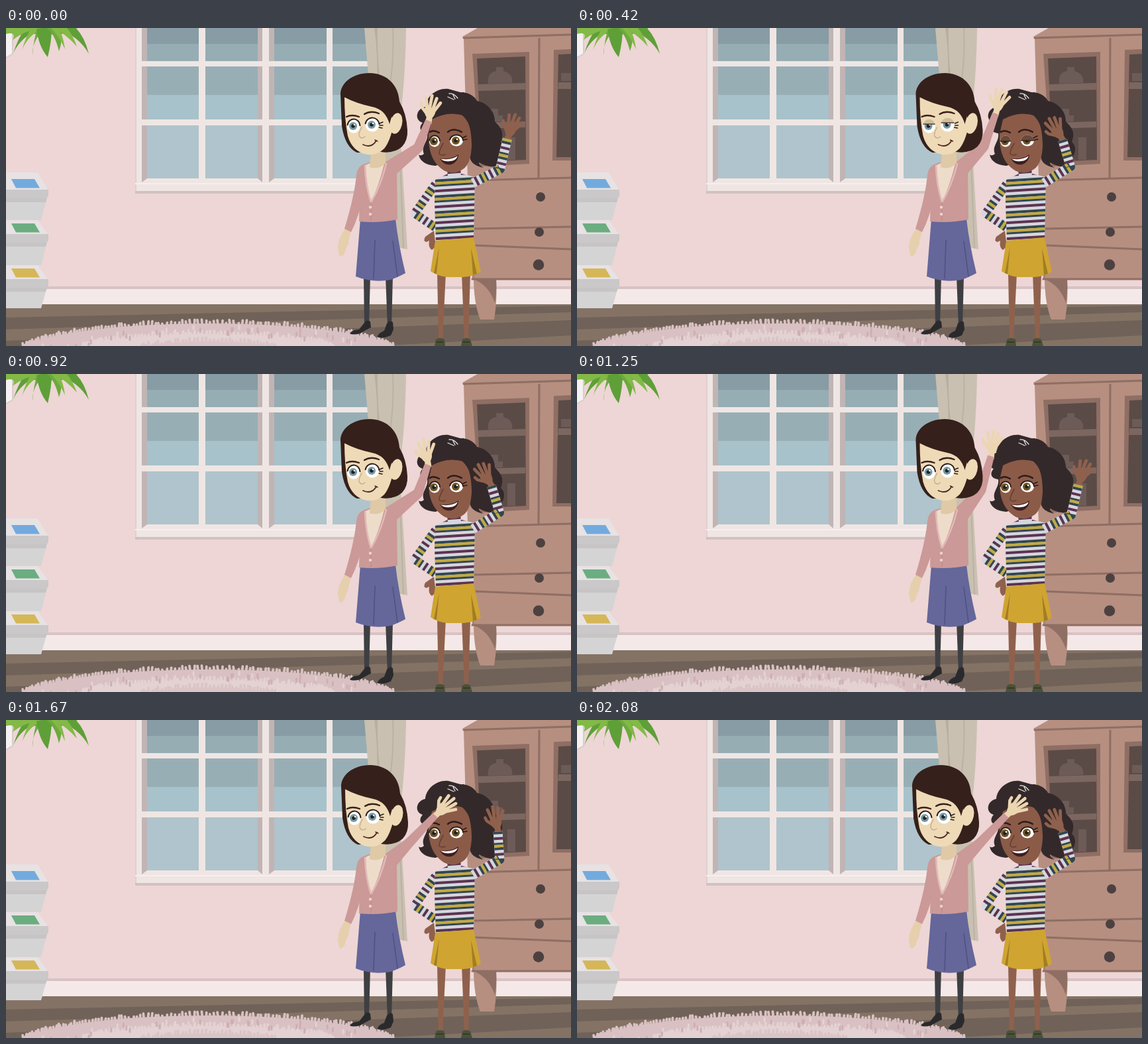
These frames come from a looping animation (853 by 480 pixels, 2160 ms). An HTML page with a canvas:

```html
<!DOCTYPE html>
<html lang="en">
<head>
<meta charset="utf-8">
<title>Two women waving</title>
<style>
html, body { margin: 0; width: 100%; height: 100%; overflow: hidden; background: #edd6d5; }
canvas { display: block; }
</style>
</head>
<body>
<canvas id="stage" width="853" height="480"></canvas>
<script>
const screen2d = document.getElementById('stage').getContext('2d');
const room = document.createElement('canvas');
room.width = 853;
room.height = 480;
let g = room.getContext('2d');

const fill = (d, color) => { g.fillStyle = color; g.fill(new Path2D(d)); };
const line = (d, color, w) => {
  g.strokeStyle = color; g.lineWidth = w; g.lineCap = g.lineJoin = 'round';
  g.stroke(new Path2D(d));
};
const rect = (x, y, x2, y2, color) => { g.fillStyle = color; g.fillRect(x, y, x2 - x, y2 - y); };
const oval = (x, y, rx, ry, color, turn = 0) => {
  g.fillStyle = color; g.beginPath(); g.ellipse(x, y, rx, ry, turn, 0, 7); g.fill();
};
let seed = 7;
const rnd = () => (seed = seed * 16807 % 2147483647) / 2147483647;

// ---------- room ----------
function drawWindow() {
  const bar = '#efe6e4', side = '#c1b4b5';
  rect(195, 0, 560, 250, bar);
  rect(195, 0, 197, 247, '#dfd0cf');
  rect(195, 246, 560, 250, '#d2c1c1');
  rect(195, 234, 560, 236, '#f6efed');
  for (const [x, x2, shade] of [[205, 291, -1], [301, 387, 1], [397, 484, -1], [493, 560, 0]]) {
    const a = shade < 0 ? x + 8 : x, b = shade > 0 ? x2 - 7 : x2;
    rect(x, 0, x2, 50, side);
    rect(x, 58, x2, 138, side);
    rect(x, 147, x2, 227, side);
    if (shade < 0) fill(`M${x} 226V233L${a} 227Z`, side);
    if (shade > 0) fill(`M${x2} 226V233L${b} 227Z`, side);
    rect(a, 0, b, 24, '#879ca4');
    rect(a, 24, b, 50, '#96adb4');
    rect(a, 58, b, 101, '#98aeb5');
    rect(a, 101, b, 138, '#a7c2ca');
    rect(a, 147, b, 227, '#afc4cc');
  }
}

function drawCurtain() {
  fill('M541 0H604Q603 65 598 110Q594 160 598 205L606 334L592 331L570 200L549 95Z', '#c9c0b1');
  fill('M556 0H561Q560 45 566 90L560 90Q562 40 556 0Z', '#b8af9f');
  line('M584 0Q586 50 579 90M595 200L600 332', '#bbb2a3', 2);
}

function drawCabinet() {
  const body = '#b68f81', dark = '#8f6e63', glass = '#5b4b47', shelf = '#7c6760';
  fill('M706 376H740Q742 410 737 440H716Q706 415 706 376Z', body);
  fill('M708 380H740Q741 400 738 415Q730 390 708 380Z', dark);
  fill('M689 13L712 0H853V380H705L697 230L691 16Z', body);
  line('M691 15L853 10', dark, 3);
  fill('M697 230L705 230L707 380L704 380Z', '#a88377');
  line('M805 16L804 226M702 230L853 226M707 303L853 300M706 328L853 334M704 379H853', dark, 3);
  fill('M704 39L790 36L790 205L716 209Z', dark);
  fill('M711 46L784 43L785 199L718 202Z', glass);
  fill('M827 33L853 32V200H825Z', dark);
  fill('M834 40L853 39V195H831Z', glass);
  fill('M713 85L784 83V93L713 95ZM715 143L784 141V150L716 152ZM834 82H853V92H833Z', shelf);
  const ware = '#6c5b57';
  fill('M728 84Q726 67 740 65V59H751V65Q766 69 764 83Z', ware);
  fill('M728 142V122H743V132H750V141ZM757 199V165H769V199ZM838 80V68H853V80Z', ware);
  oval(807, 255, 7, 7, '#4c4140');
  oval(805, 308, 7, 7, '#4c4140');
  oval(804, 357.5, 8.3, 8.3, '#4c4140');
}

function drawBins() {
  [[218, '#73aadd'], [290, '#6bad80'], [358, '#d5b758']].forEach(([y, tint], i) => {
    const lip = y + (i ? 22 : 27);
    const end = [290, 358, 423][i];
    fill(`M0 ${lip + 11}H62L53 ${end}H0Z`, '#d5d4d5');
    fill(`M0 ${lip + 11}H62L60 ${lip + 18}H0Z`, '#c6c4c5');
    fill(`M0 ${y}H48L64 ${lip}H0Z`, '#e7e2e3');
    fill(`M0 ${lip - 1}H64V${lip + 9}L61 ${lip + 12}H0Z`, '#cbc8c9');
    const t = lip - 17;
    fill(`M8 ${t}H43L51 ${t + 13.5}H15Z`, tint);
  });
}

function drawPlant() {
  const dark = '#5f9f38', mid = '#6ca93e', light = '#82b947';
  const leaf = (x, y, cx, cy, w, color) =>
    fill(`M60 ${-8 - w}Q${cx} ${cy - w} ${x} ${y}Q${cx - 4} ${cy + w} 64 -4Z`, color);
  fill('M8 0H108Q92 12 64 9Q34 12 8 0Z', mid);
  leaf(125, 39, 112, -4, 12, dark);
  leaf(107, 28, 93, -3, 10, light);
  leaf(11, 38, 28, -3, 12, dark);
  leaf(24, 34, 36, 0, 10, light);
  leaf(40, 41, 43, 6, 10, mid);
  fill('M46 0Q49 28 63 44Q69 20 69 0Z', dark);
  fill('M62 0Q74 10 80 35Q88 12 79 0Z', mid);
  leaf(89, 32, 85, 4, 9, light);
  fill('M0 -1H10Q35 -2 54 0Q28 4 10 18Q16 5 0 9Z', light);
}

function drawRug() {
  const ring = (rx, ry, color) => {
    oval(306, 493, rx, ry, color);
    for (let a = 3.2; a < 6.25; a += 6 / rx) {
      const x = 306 + rx * Math.cos(a), y = 493 + ry * Math.sin(a);
      if (y < 482) line(`M${x} ${y + 4}l${rnd() * 3 - 1.5} ${-5 - rnd() * 5}`, color, 3.8);
    }
  };
  ring(288, 47, '#d9c1c3');
  ring(205, 31, '#e4d2d3');
  ring(122, 20, '#dac4c6');
  for (let i = 0; i < 55; i++) {
    const a = 3.25 + rnd() * 2.8, r = 0.72 + rnd() * 0.26;
    const x = 306 + 288 * r * Math.cos(a), y = 494 + 47 * r * Math.sin(a);
    line(`M${x} ${y}v5`, i % 3 ? '#cfafb3' : '#e4d2d3', 3);
  }
}

function drawRoom() {
  rect(0, 0, 853, 480, '#edd6d5');
  rect(0, 390, 853, 394, '#d8c2c3');
  rect(0, 394, 853, 417, '#f4e9e8');
  rect(0, 417, 853, 480, '#847365');
  fill('M0 437L853 419V429L0 455Z', '#706258');
  fill('M0 472L853 441V464L560 480H0Z', '#706258');
  fill('M0 0H10V38L0 46Z', '#f5f1f0');
  line('M10 0V39L0 45', '#d8cccc', 2);
  drawWindow();
  drawCurtain();
  drawCabinet();
  drawBins();
  drawPlant();
  drawRug();
}

// ---------- figure parts ----------
function limb(pts, widths, color) {
  g.fillStyle = color;
  for (let i = 0; i + 1 < pts.length; i++) {
    const [x, y] = pts[i], [u, v] = pts[i + 1];
    const a = Math.atan2(v - y, u - x) + Math.PI / 2;
    const c = Math.cos(a), s = Math.sin(a), p = widths[i] / 2, q = widths[i + 1] / 2;
    g.beginPath();
    g.moveTo(x + c * p, y + s * p); g.lineTo(u + c * q, v + s * q);
    g.lineTo(u - c * q, v - s * q); g.lineTo(x - c * p, y - s * p);
    g.fill();
    if (i) oval(x, y, p, p, color);
  }
}

function hand(x, y, deg, color) {
  g.save();
  g.translate(x, y);
  g.rotate(deg * Math.PI / 180);
  fill('M-5 4L-4 -5Q-10 -12 -8 -20L8 -20Q10 -12 5 -5L5 4Z', color);
  line('M-6 -12L-13 -19L-14.5 -24', color, 4.6);
  line('M-5 -19L-8.5 -35M-1 -20L0 -38M4 -19L7.5 -35M6.5 -16L14 -29', color, 4.8);
  g.restore();
}

function eye(x, y, rx, ry, iris, lid, skin) {
  g.save();
  g.beginPath(); g.ellipse(x, y, rx, ry, 0, 0, 7); g.clip();
  rect(x - 15, y - 15, x + 15, y + 15, '#fff');
  oval(x - 1, y, 6, 6, iris);
  oval(x - 1, y, 2.8, 2.8, '#22201f');
  oval(x + 1, y - 2, 1.3, 1.3, '#fff');
  if (lid > 0) {
    const edge = y - ry + 2 * ry * lid;
    rect(x - 15, y - 15, x + 15, edge, skin);
    rect(x - 15, edge - 0.6, x + 15, edge + 0.6, '#2b1b18');
  }
  g.restore();
  if (!lid) {
    g.strokeStyle = '#2b1b18'; g.lineWidth = 2;
    g.beginPath(); g.ellipse(x, y, rx, ry, 0, 3.3, 6.2); g.stroke();
  }
}

// bands of one repeat: colour, start, width
const repeat = 24;
const yarn = [['#5c3350', 4.5, 4], ['#34464c', 13, 4], ['#c3a941', 17, 4], ['#34464c', 21, 3]];
function knit(d, w) {
  const path = new Path2D(d);
  g.save();
  g.lineCap = 'butt'; g.lineJoin = 'round'; g.lineWidth = w;
  g.strokeStyle = '#d6d6df';
  g.stroke(path);
  for (const [color, start, size] of yarn) {
    g.strokeStyle = color;
    g.setLineDash([size, repeat - size]);
    g.lineDashOffset = -start;
    g.stroke(path);
  }
  g.restore();
}

// ---------- woman in stripes ----------
function drawStripes(arm, lid) {
  const skin = '#8f614d', face = '#8b5b48', hair = '#34292a';
  const [ex, ey, wx, wy, turn] = arm;
  fill('M651 370H664L659 472H653Z', skin);
  fill('M688 370H701L698 472H692Z', skin);
  fill('M649 470Q655 466 662 470L663 480H647ZM689 470Q695 466 701 470L704 480H687Z', '#4b5138');
  line('M650 474H660M690 474H700', '#2f3424', 1.5);

  fill('M668 92C650 90 634 104 633 119C619 122 616 139 629 143C622 151 626 158 636 159C638 172 626 177 631 190Q626 194 623 191Q626 206 648 208L700 192Q700 207 721 211Q714 207 714 203C735 214 744 209 742 202C755 190 754 178 747 172C754 155 744 148 738 141C738 125 726 113 711 110C706 101 697 97 686 97Z', hair);
  line('M690 98Q695 102 698 108', hair, 2.5);

  fill('M646 306L633 315Q629 322 635 323L639 321Q637 331 643 335L649 330Z', skin);
  knit('M651 232L617 280L648 301', 13);
  g.save();
  g.clip(new Path2D('M648 229L667 220H688L708 225L706 318L649 323L647 262Z'));
  knit('M674 214L681 330', 90);
  g.restore();
  fill('M648 321L706 316L717 368Q705 375 690 376H666Q650 374 641 367Z', '#cfa431');
  fill('M654 330L650 371L646 370ZM702 332L711 371L705 373Z', '#a17d22');

  fill('M669 203L687 198L685 217H668Z', '#744a3a');
  knit('M677 224L676 211', 20);
  fill('M643 138Q668 124 694 133Q706 146 703 178Q702 205 690 213Q677 222 663 216C647 207 637 190 638 160Z', face);
  fill('M640 160Q636 141 651 128Q683 117 697 142Q704 155 703 192Q721 174 719 140L690 105L650 110L632 136Z', hair);
  fill('M641 149Q646 134 668 131Q692 128 697 150L696 164L641 167Z', face);
  line('M669 99Q676 98 682 106M667 104L676 108M675 101L678 107', '#e9e6e6', 1.3);

  eye(647, 171, 8, 8.5, '#6c5426', lid, '#684a3d');
  eye(680, 170, 10, 8.5, '#6c5426', lid, '#684a3d');
  line('M689 166L695 163M690 169L696 168', '#2a1b18', 1.4);
  line('M640 157Q645 153 654 158M667 157Q675 150 688 157', '#2b1c1a', 2.4);
  line('M660 174Q653 187 654 190Q657 193 663 191', '#65402f', 1.6);
  fill('M655 197Q672 199 683 191Q683 202 672 206Q661 208 655 197Z', '#3d1d20');
  fill('M656 197.5Q672 200 682 193Q679 201 670 201Q661 202 656 197.5Z', '#fff');

  hand(wx, wy, turn, skin);
  knit(`M705 234L${ex} ${ey}L${wx} ${wy}`, 14);
}

// ---------- woman in cardigan ----------
function drawCardigan(pose, lid) {
  const skin = '#eedab7', shade = '#e6cfac', hair = '#35201b', wool = '#cb9997';
  const lidSkin = '#d0bd98', iris = '#7799a3';
  const [ex, ey, wx, wy, turn, dx] = pose;
  fill('M540 374H550L548 450H541ZM573 374H584L582 452H576Z', '#3e3f43');
  fill('M541 445Q545 439 550 443L551 452Q541 457 535 461Q523 464 519 461Q522 456 533 455Z', '#2a2a2d');
  fill('M575 446Q580 440 584 444L585 455L581 464Q567 470 560 466Q563 460 571 457Z', '#2a2a2d');

  fill('M512 303Q502 316 501 331L503 343Q506 347 508 343Q512 341 513 333Q518 325 517 321L521 307Z', shade);
  fill('M540 206Q531 208 529 222Q526 254 511 303L521 308Q533 285 540 250Z', wool);

  hand(wx, wy, turn, '#ecd6b2');
  limb([[579, 213], [ex, ey], [wx, wy]], [25, 15, 10], wool);

  fill('M535 288H588Q592 325 603 370Q594 375 581 380Q553 385 528 375Z', '#65669a');
  line('M557 320L555 378M584 322L591 375', '#515282', 1.6);
  fill('M537 207Q552 199 571 203Q586 204 590 218L591 289Q562 295 533 292L534 250Z', wool);
  fill('M543 207Q557 199 571 205Q563 238 551 263Q543 235 543 207Z', '#eedccb');
  fill('M551 188H573V204Q562 215 549 210Z', '#e0c9a6');
  line('M542 208Q543 238 551 263Q566 238 574 205', '#e2bab8', 2.6);
  line('M551 263V291', '#b98583', 1);
  oval(550, 270.5, 2.2, 2.2, '#ebd3d0');
  oval(550, 281, 2.2, 2.2, '#ebd3d0');

  g.save();
  g.translate(dx, 0);
  fill('M549 68C522 68 505 84 505 100L507 148Q512 180 530 188L566 187Q586 190 598 179Q607 169 606 154Q605 130 594 111C592 82 571 68 549 68Z', hair);
  fill('M511 104Q548 102 580 124L585 146Q580 171 571 182Q560 193 545 191Q523 187 516 163Q511 138 511 104Z', skin);
  fill('M510 104Q529 114 553 119Q573 123 579 145L586 120L565 96L510 94Z', hair);
  oval(589, 144, 9, 16, skin, 0.22);
  eye(525, 148, 9.5, 10.5, iris, lid, lidSkin);
  eye(553, 146, 10.5, 10.5, iris, lid, lidSkin);
  line('M564 144L569 142M564 147L569 147M563 150L568 151', '#2b1b18', 1.4);
  line('M514 134Q522 130 533 134M541 130Q551 124 563 129', hair, 2.3);
  line('M537 150Q531 161 534 164Q537 168 542 164', '#c9ad88', 1.5);
  line('M539 176Q552 182 559 170', '#4b2923', 1.8);
  line('M557 169L561 171', '#4b2923', 1.4);
  g.restore();
}

// ---------- motion: each key is a step followed by its values ----------
function at(keys, k) {
  let i = keys.length - 1;
  while (i && keys[i][0] > k) i--;
  const a = keys[i], b = keys[i + 1] || a;
  const p = b === a ? 0 : (k - a[0]) / (b[0] - a[0]);
  const e = p * p * (3 - 2 * p);
  return a.slice(1).map((v, j) => v + (b[j + 1] - v) * e);
}

// elbow, wrist, hand angle, head shift
const wave = [
  [0, 622, 181, 638, 140, 8, 0],
  [2, 612, 186, 654, 148, 38, 1],
  [4, 618, 179, 633, 132, -5, 5],
  [5, 614, 179, 632, 129, 15, 6.5],
  [7, 615, 187, 656, 150, 38, -3],
  [11, 622, 180, 637, 137, -10, 0],
  [13, 612, 184, 650, 145, 32, 3],
  [15, 610, 175, 625, 124, 6, 6.5],
  [17, 612, 180, 630, 130, 2, 4],
  [20, 608, 186, 648, 144, 48, 1],
  [22.5, 615, 180, 634, 133, 0, 3],
  [25, 608, 186, 648, 144, 48, 1]
];
const swing = [[0, 0], [3, 1], [5, 1], [7, 0], [8, 0], [11, 1], [14, 0], [15, 0],
  [18, 1], [19, 1], [20, 0.6], [22, 0], [25, 1]];
const blinkA = [[3, 0], [5, 0.36], [6, 0.6], [7, 0.34], [8, 0]];
const blinkB = [[3, 0], [5, 0.5], [6, 0.4], [7, 0]];
const blink = (keys, k) => k < 3 ? 0 : at(keys, k)[0];

function frame(now) {
  const tick = Math.floor(now % 2160 / 10);
  const k = Math.ceil((tick + 1) * 3 / 25) - 1; // twelve steps a second
  const [s] = at(swing, k);
  g.drawImage(room, 0, 0);
  drawStripes([746 - s, 213 - s * 4, 757 - s * 24, 167 + s * 2, 18 - s * 50], blink(blinkB, k));
  drawCardigan(at(wave, k), blink(blinkA, k));
}

drawRoom();
g = screen2d;
let begin;
function loop(now) {
  begin ??= now;
  frame(now - begin);
  requestAnimationFrame(loop);
}
frame(0);
requestAnimationFrame(loop);
</script>
</body>
</html>
```
